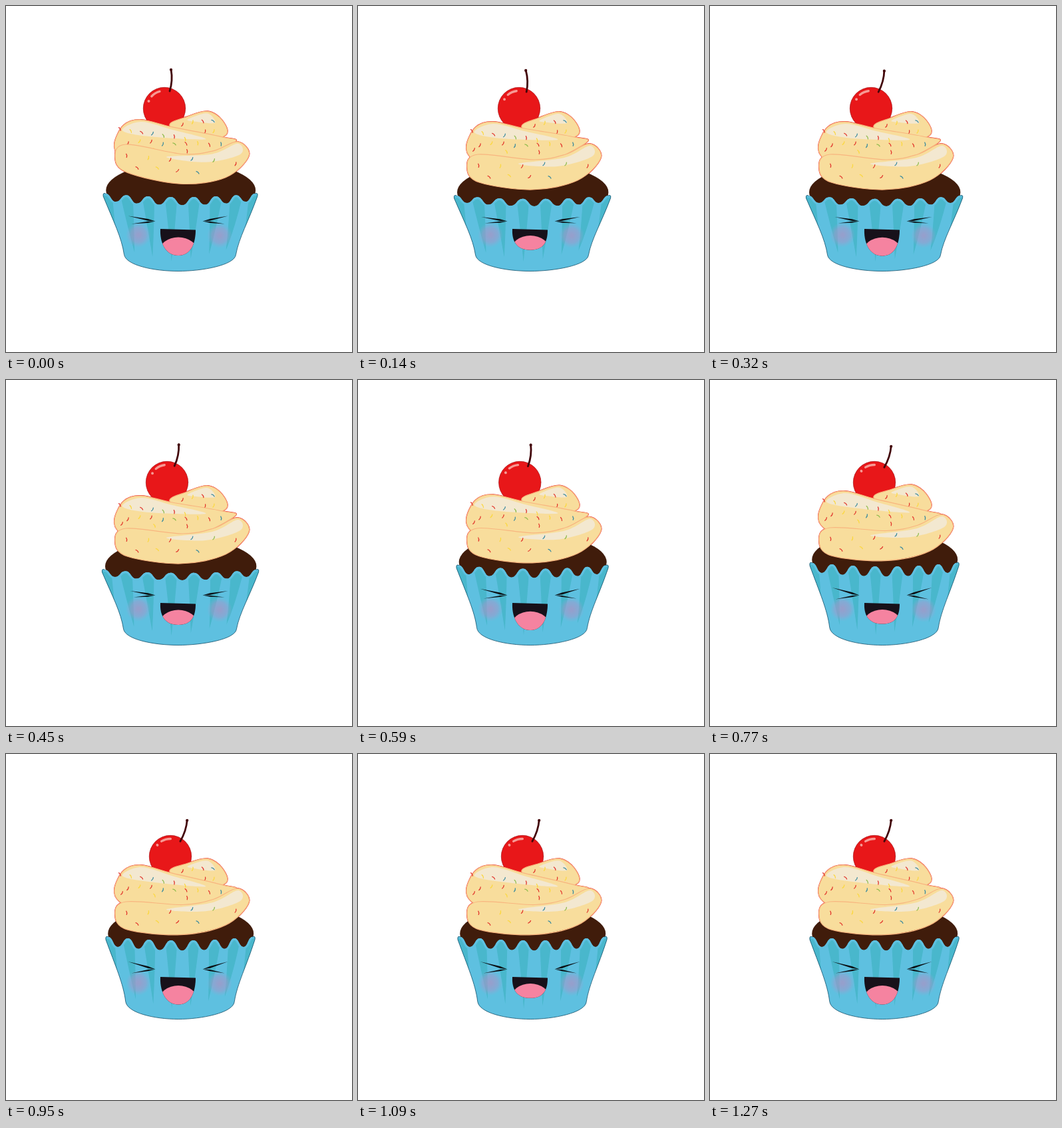
Write an HTML page with a canvas that moves like this. It is 520 by 520 pixels and loops after 1310 ms.

```html
<!DOCTYPE html>
<html lang="en">
<head>
<meta charset="utf-8">
<title>Laughing cupcake</title>
<style>
  html, body { margin: 0; width: 100%; height: 100%; overflow: hidden; background: #fff; }
  canvas { display: block; width: 520px; height: 520px; }
</style>
</head>
<body>
<canvas id="stage" width="520" height="520"></canvas>
<script>
const ctx = document.getElementById('stage').getContext('2d');
const LOOP = 1310, STEPS = 29, TAU = 2 * Math.PI;

const CREAM = '#f8dd9c', PALE = '#f3e8d0', EDGE = '#f8b57f';
const BLUE = '#5ec0e0', TEAL = '#49b7cc';
const SPRINKLES = ['#e2362c', '#fbd83f', '#e2362c', '#3a8a9e', '#8fbb4b'];

// Frosting swirls: outline, highlight, and rows of sprinkles [x0, y0, x1, y1, count]
const BACK = {
  shape: [[246, 182], [272, 168], [303, 159], [325, 172], [330, 194], [285, 205]],
  shine: [[273, 172], [302, 162], [314, 176], [285, 175]],
  rows: [[265, 180, 311, 173, 4], [299, 188, 312, 190, 2]],
};
const MIDDLE = {
  shape: [[163, 210], [177, 182], [203, 174], [250, 184], [325, 197], [342, 206], [260, 245], [200, 240], [171, 229]],
  shine: [[175, 190], [203, 177], [250, 188], [300, 201], [215, 199]],
  rows: [[171, 187, 269, 202, 7], [183, 208, 323, 209, 9], [174, 216, 272, 221, 3]],
};
const FRONT = {
  shape: [[164, 243], [180, 223], [265, 231], [312, 223], [348, 207], [365, 228], [330, 262], [262, 276], [182, 265]],
  shine: [[241, 237], [310, 228], [348, 210], [352, 226], [300, 241]],
  rows: [[181, 240, 345, 239, 6], [197, 256, 288, 257, 4]],
};

const clamp = v => Math.max(0, Math.min(1, v));
const mix = (a, b, k) => a + (b - a) * k;
const noise = n => { const v = Math.sin(n * 12.9898) * 43758.5453; return v - Math.floor(v); };

function poseAt(step) {
  const jolt = clamp(1 - step / 2);        // landing at the start of the loop
  const k = clamp((step - 11) / 5);        // rise halfway through
  const swell = k ** 1.5;
  const swing = 4 - 5 * Math.cos(TAU * (step - 3) / 9);
  return {
    stretch: .3 * jolt + 1 - (1 - k) ** 2,
    middle: -7 * swell - 3 * jolt,
    left: -swell - 15 * jolt,
    centre: -4.5 * swell - 8.5 * jolt,
    right: -5 * swell - 3 * jolt,
    cherryX: 242 + 5 * swell - 4 * jolt,
    lean: mix(swing, 10.3, k) - 4.5 * jolt,
    eyeX: 183.5 + 4 * (1 - k) * Math.sin(Math.PI * step / 14) ** 2,
    open: .5 + .5 * Math.cos(TAU * (step * 4 / STEPS - .87)),
  };
}

function fill(color, path = null) {
  ctx.fillStyle = color;
  path ? ctx.fill(path) : ctx.fill();
}

function stroke(color, width, path = null) {
  ctx.strokeStyle = color;
  ctx.lineWidth = width;
  path ? ctx.stroke(path) : ctx.stroke();
}

// Closed smooth curve through the points, each moved by lift(x)
function blob(points, lift) {
  const n = points.length, path = new Path2D();
  const pt = i => {
    const [x, y] = points[(i + n) % n];
    return [x, y + lift(x)];
  };
  path.moveTo(...pt(0));
  for (let i = 0; i < n; i++) {
    const [p, a, b, q] = [pt(i - 1), pt(i), pt(i + 1), pt(i + 2)];
    path.bezierCurveTo(a[0] + (b[0] - p[0]) / 6, a[1] + (b[1] - p[1]) / 6,
      b[0] - (q[0] - a[0]) / 6, b[1] - (q[1] - a[1]) / 6, ...b);
  }
  path.closePath();
  return path;
}

function drawSprinkles([x0, y0, x1, y1, count], lift) {
  for (let i = 0; i < count; i++) {
    const k = i / (count - 1), seed = x0 + i;
    const x = mix(x0, x1, k), y = mix(y0, y1, k) + 4 * noise(seed) - 2;
    ctx.save();
    ctx.translate(x, y + lift(x));
    ctx.rotate(mix(.6, 2.4, noise(seed + .5)));
    ctx.beginPath();
    ctx.moveTo(-2.6, 0);
    ctx.quadraticCurveTo(0, -1.4, 2.6, 0);
    stroke(SPRINKLES[i % SPRINKLES.length], 1.3);
    ctx.restore();
  }
}

function drawLayer(layer, lift) {
  const shape = blob(layer.shape, lift);
  fill(CREAM, shape);
  fill(PALE, blob(layer.shine, lift));
  stroke(EDGE, 1.2, shape);
  layer.rows.forEach(row => drawSprinkles(row, lift));
}

function drawCherry(x, lean) {
  const roll = (x - 238) / 32;
  ctx.save();
  ctx.translate(x, 154);
  ctx.beginPath();
  ctx.arc(0, 0, 31.7, 0, TAU);
  fill('#e81719');
  stroke('#a50f14', .7);
  ctx.rotate(roll);
  ctx.beginPath();
  ctx.arc(-23.5, -11, 2, 0, TAU);
  fill('#f79a94');
  ctx.beginPath();
  ctx.arc(0, 0, 26.5, -2.38, -1.84);
  stroke('#f79a94', 3.4);
  ctx.restore();

  const bx = x + 8 * Math.cos(roll) + 26 * Math.sin(roll);
  const by = 154 + 8 * Math.sin(roll) - 26 * Math.cos(roll);
  const tx = bx + lean, ty = by - 33 + Math.abs(lean) * .1;
  ctx.beginPath();
  ctx.moveTo(bx, by);
  ctx.quadraticCurveTo(mix(bx, tx, .5) + 4, by - 16, tx, ty);
  stroke('#43060a', 2.8);
  ctx.beginPath();
  ctx.arc(tx, ty + .6, 2.1, 0, TAU);
  fill('#43060a');
}

// Scalloped edge: even points are peaks, odd points are troughs
function rimPoint(i, u) {
  const s = i / 14, arch = Math.sin(Math.PI * s);
  const x = 148 + 228 * s + 3 * arch - 3 * Math.sin(TAU * s);
  return i % 2 ? [x, 294.5 + 6.5 * arch + 3 * u] : [x, 285 + 5 * arch];
}

function drawCup(u) {
  const P = (x, y) => {
    const height = (398 - y) / 110;
    return [262 + (x - 262) * (1 - mix(.035, .047, height) * u), y - 10 * u * height];
  };
  const addRim = path => {
    path.moveTo(...P(...rimPoint(0, u)));
    for (let i = 1; i < 15; i++) {
      const [x0, y0] = P(...rimPoint(i - 1, u)), [x1, y1] = P(...rimPoint(i, u));
      const xm = (x0 + x1) / 2;
      path.bezierCurveTo(xm, y0, xm, y1, x1, y1);
    }
  };
  const addSides = path => {
    path.quadraticCurveTo(...P(381, 283), ...P(379.5, 289));
    path.bezierCurveTo(...P(366, 325), ...P(351, 350), ...P(346.5, 374));
    path.bezierCurveTo(...P(345, 390), ...P(294, 398.5), ...P(259, 398.5));
    path.bezierCurveTo(...P(222, 398.5), ...P(179, 390), ...P(176.5, 374));
    path.bezierCurveTo(...P(173, 350), ...P(160, 325), ...P(144.5, 289));
    path.quadraticCurveTo(...P(143.5, 283), ...P(148, 285));
  };
  const wall = new Path2D(), rim = new Path2D(), sides = new Path2D();
  addRim(rim);
  addRim(wall);
  addSides(wall);
  sides.moveTo(...P(376, 285));
  addSides(sides);

  fill(BLUE, wall);
  ctx.save();
  ctx.clip(wall);
  for (let i = 0; i < 15; i += 2) {
    const [x, y] = rimPoint(i, u);
    const endX = mix(255, x, .83), endY = 386 - Math.abs(x - 255) * .2;
    ctx.beginPath();
    ctx.moveTo(...P(x - 9, y));
    ctx.quadraticCurveTo(...P(mix(x, endX, .5) - 4, 335), ...P(endX, endY));
    ctx.quadraticCurveTo(...P(mix(x, endX, .5) + 6, 335), ...P(x + 10, y));
    fill(TEAL);
  }
  stroke(BLUE, 6, rim);
  ctx.restore();
  stroke('#12506a', .8, sides);
}

function drawEye(x, facing, tip, u) {
  const wedge = (tipX, tipY, top, bottom) => {
    ctx.beginPath();
    ctx.moveTo(tipX, tipY);
    ctx.lineTo(-11, top);
    ctx.lineTo(0, 0);
    ctx.lineTo(-11, bottom);
    fill('#0b1116');
  };
  ctx.save();
  ctx.translate(x, 323.5);
  ctx.scale(facing, 1);
  wedge(tip, -6.5 - 5 * u, -3.2 - 1.2 * u, -.4 - u);
  wedge(tip + 5, 3 + 3 * u, .2 + .4 * u, 2.2 + .6 * u);
  ctx.restore();
}

function drawCheek(x, y) {
  const glow = ctx.createRadialGradient(x, y, 2, x, y, 19);
  glow.addColorStop(0, 'rgba(172,146,196,.7)');
  glow.addColorStop(.55, 'rgba(166,150,202,.5)');
  glow.addColorStop(1, 'rgba(150,165,210,0)');
  ctx.fillStyle = glow;
  ctx.fillRect(x - 19, y - 19, 38, 38);
}

function drawMouth(open) {
  const bottom = 366.5 + 10 * open;
  ctx.save();
  ctx.beginPath();
  ctx.moveTo(232, 335);
  ctx.lineTo(285, 336.5);
  ctx.bezierCurveTo(285, 353, 280, bottom, 259, bottom);
  ctx.bezierCurveTo(238, bottom, 231, 353, 232, 335);
  fill('#17111a');
  ctx.clip();
  ctx.beginPath();
  ctx.ellipse(259, 367 + 3 * open, 29, 22, 0, 0, TAU);
  fill('#f583a0');
  ctx.restore();
}

function draw(step) {
  const pose = poseAt(step), u = pose.stretch;
  const liftMiddle = x => pose.middle * clamp((330 - x) / 115);
  const liftFront = x => x < 265
    ? mix(pose.left, pose.centre, clamp((x - 180) / 85))
    : mix(pose.centre, pose.right, clamp((x - 265) / 85));
  const layers = [[BACK, liftMiddle], [MIDDLE, liftMiddle], [FRONT, liftFront]];

  ctx.fillStyle = '#fff';
  ctx.fillRect(0, 0, 520, 520);
  for (const [layer, lift] of layers) stroke('#e8302c', 2, blob(layer.shape, lift));

  ctx.beginPath();
  ctx.ellipse(262.7, 280 - 10 * u, 113.7 - 4.2 * u, 42, 0, 0, TAU);
  fill('#401c0b');

  drawCherry(pose.cherryX, pose.lean);
  for (const [layer, lift] of layers) drawLayer(layer, lift);
  drawCup(u);
  drawCheek(199, 344);
  drawCheek(321, 345);
  drawEye(224.5, 1, pose.eyeX - 224.5, u);
  drawEye(295.5, -1, -38, u);
  drawMouth(pose.open);
}

const start = performance.now();
function tick() {
  const t = (performance.now() - start) % LOOP;
  draw(Math.floor(t / LOOP * STEPS));
  requestAnimationFrame(tick);
}
ctx.lineCap = 'round';
tick();
</script>
</body>
</html>
```
